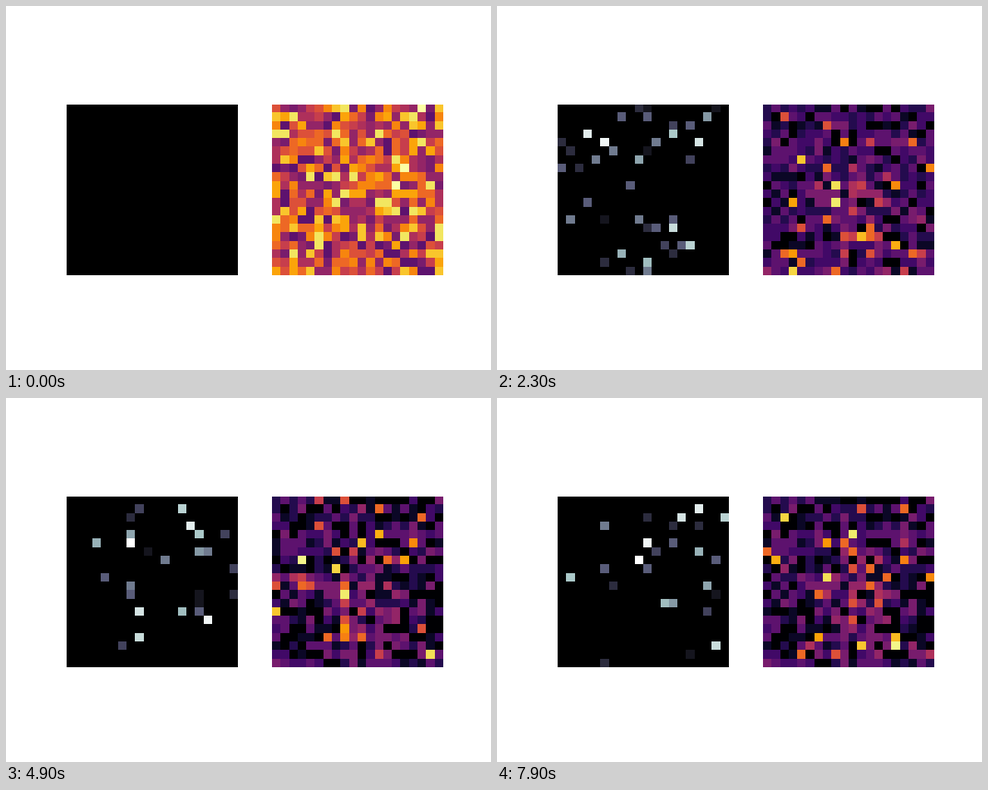
Animation, 640 px wide and 480 px high, one loop 8000 ms. Source, as a matplotlib script:

```python
import numpy as np
import matplotlib.pyplot as plt
from matplotlib.animation import FuncAnimation

SIZE = 20
FRAMES = 80
WALKERS = 11
STEP = 1 / 15  # charge comes in fifteenths
rng = np.random.default_rng(12)


def quantize(grid):
    return np.round(grid / STEP) * STEP


def random_walk():
    """Wandering cells as (frame, walker, col/row), reflected at the edges."""
    first = rng.integers(1, SIZE - 1, (WALKERS, 2))
    steps = rng.integers(-1, 2, (FRAMES, WALKERS, 2))
    last = SIZE - 1
    pos = (first + steps.cumsum(axis=0)) % (2 * last)
    return last - np.abs(last - pos)


spark_walk, hot_walk = random_walk(), random_walk()

# Each cell starts charged, is spent after its first discharge, then rests
yy, xx = np.mgrid[:SIZE, :SIZE]
centre = np.exp(-((xx - 11) ** 2 + (yy - 11) ** 2) / 18)
shape = (SIZE, SIZE)
start = quantize(0.24 + 0.74 * rng.beta(1.1, 1.4, shape))
spent = quantize(np.clip(rng.normal(0.21, 0.06, shape) + 0.06 * centre, 0.07, 0.4))
rest = quantize(np.clip(rng.uniform(-0.12, 0.34, shape) + 0.13 * centre, 0, 0.4))
first_drop = 2 + rng.exponential(3.5, shape)
settle = rng.uniform(16, 29, shape)


def place_walkers(grid, walk, n, low, high, first_col=0):
    col, row = walk[n].T
    levels = np.linspace(high, low, WALKERS)
    grid[row, np.maximum(col, first_col)] = np.roll(levels, n)


def activity(n):
    grid = np.zeros(shape)
    if n < 2:
        return grid
    r = np.random.default_rng(500 + n)
    edge = int(n >= 28)  # the rim falls quiet later on
    dim = int(14 + 130 * np.exp(-n / 11.5))
    rows, cols = r.integers(edge, SIZE, (2, dim))
    grid[rows, cols] = r.integers(1, 6, dim) / 10
    place_walkers(grid, spark_walk, n, 0.6, 1, edge)
    return grid


def charge(n):
    if n < 2:
        return start
    grid = np.where(n < first_drop, start,
                    np.where(n < settle, spent, rest))
    r = np.random.default_rng(900 + n)
    warm = int(28 + 40 * np.exp(-n / 15))
    spread = r.integers(0, SIZE, (2, warm))
    middle = np.clip(r.normal(11, 3.5, (2, warm)), 0, SIZE - 1).astype(int)
    rows, cols = np.where(r.random(warm) < 0.4, middle, spread)
    grid[rows, cols] = r.integers(6, 11, warm) * STEP
    place_walkers(grid, hot_walk, n, 0.72, 0.97)
    return grid


fig, axes = plt.subplots(1, 2, figsize=(6.4, 4.8), dpi=100)
fields = (activity, charge)
images = []
for ax, cmap, field in zip(axes, ("bone", "inferno"), fields):
    ax.axis("off")
    images.append(ax.imshow(field(0), cmap=cmap, vmin=0, vmax=1))


def update(n):
    for image, field in zip(images, fields):
        image.set_data(field(n))
    return images


anim = FuncAnimation(fig, update, frames=FRAMES, interval=100, repeat=True)
plt.show()
```
